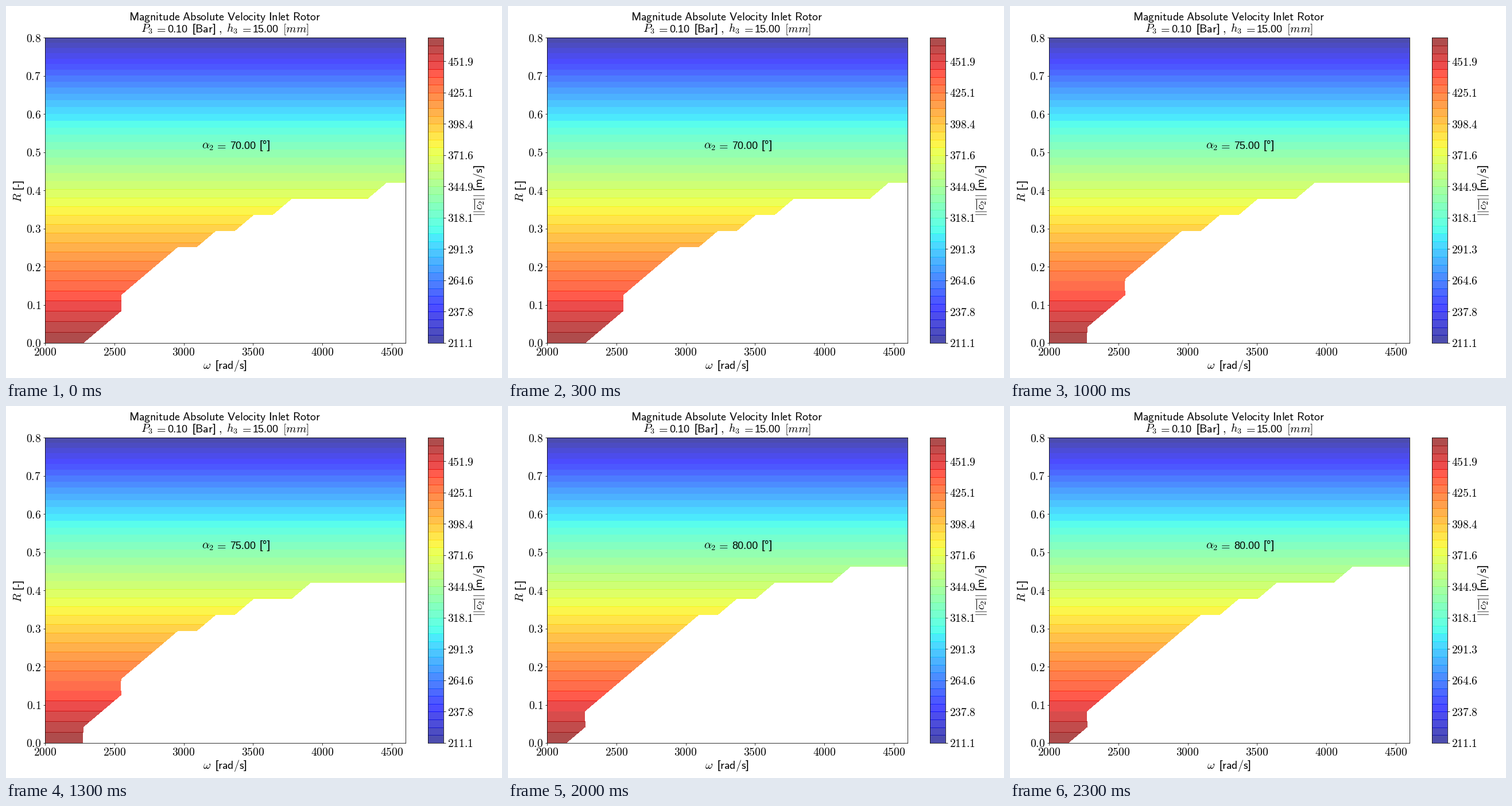
Write a matplotlib script that moves like this. It is 864 by 648 pixels and loops after 2.5 s.

```python
import numpy as np
import matplotlib.pyplot as plt
from matplotlib.animation import FuncAnimation

W, H = 864, 648
DPI = 72
TOP, BOTTOM = 55.45, 586.95
DIGITS = 18  # size of the sans-serif numbers

plt.rcParams.update({
    "font.family": "Liberation Sans",
    "font.size": 20,
    "xtick.labelsize": 19.6,
    "ytick.labelsize": 19.6,
    "mathtext.fontset": "cm",
})

fig = plt.figure(figsize=(W / DPI, H / DPI), dpi=DPI, facecolor="white")


def px_axes(left, right):
    """Axes between two pixel columns, spanning the shared rows."""
    return fig.add_axes([left / W, 1 - BOTTOM / H,
                         (right - left) / W, (BOTTOM - TOP) / H])


def label(x, y, text, size=20, rotation=0):
    return fig.text(x / W, 1 - y / H, text, size=size, rotation=rotation,
                    ha="center", va="baseline", rotation_mode="anchor")


def number_format(digits):
    return lambda value, _: f"${value:.{digits}f}$"


# Velocity field: depends on the degree of reaction only
N = 20
omega = np.linspace(2000, 4600, N)
reaction = np.linspace(0, 0.8, N)
speed = 471.97 * np.sqrt(1 - reaction)[:, None] * np.ones(N)
levels = np.linspace(speed.min(), speed.max(), 40)

# Last feasible speed column in each reaction row, per flow angle
angles = [70, 72.5, 75, 77.5, 80]
limits = [
    [2, 3, 4, 4, 5, 6, 8, 10, 12, 17],
    [2, 3, 3, 4, 5, 6, 7, 9, 11, 14],
    [2, 2, 3, 4, 4, 5, 6, 8, 10, 13],
    [1, 2, 2, 3, 4, 5, 6, 7, 9, 12, 16],
    [1, 2, 2, 3, 4, 5, 6, 7, 9, 11, 15],
]

ax = px_axes(68.15, 696.05)


def draw_map(limit):
    last = np.full(N, N - 1)
    last[:len(limit)] = limit
    field = np.ma.masked_where(np.arange(N) > last[:, None], speed)
    return ax.contourf(omega, reaction, field, levels, cmap="jet", alpha=0.7)


maps = [draw_map(limit) for limit in limits]
ax.set(xlim=(2000, 4600), ylim=(0, 0.8),
       xticks=np.arange(2000, 4501, 500), yticks=np.linspace(0, 0.8, 9))
ax.xaxis.set_major_formatter(number_format(0))
ax.yaxis.set_major_formatter(number_format(1))

# Colour scale: bands blended with white, darker seams between them
bar = px_axes(735.25, 761.85)
middles = (levels[:-1] + levels[1:]) / 2
rgb = maps[0].cmap(maps[0].norm(middles))[:, :3]
bar.pcolormesh([0, 1], levels, (0.3 + 0.7 * rgb)[:, None, :])
bar.hlines(levels[1:-1], 0, 1, colors=0.09 + 0.91 * rgb[1:], linewidth=1)
bar.set(xlim=(0, 1), ylim=(levels[0], levels[-1]),
        xticks=[], yticks=levels[::4])
bar.yaxis.tick_right()
bar.yaxis.set_major_formatter(number_format(1))

# Title
label(381, 25, r"$\mathsf{Magnitude\ Absolute\ Velocity\ Inlet\ Rotor}$", 19.8)
for x, text in [(245.5, "$P_3$"), (268.5, "$=$"), (345, r"[$\mathsf{Bar}$]"),
                (373.5, "$,$"), (394, "$h_3$"), (417.5, "$=$"),
                (504.5, "$[mm]$")]:
    label(x, 46, text)
label(298.5, 46, "0.10", DIGITS)
label(452.5, 46, "15.00", DIGITS)

# Axis labels
label(350.5, 632, r"$\omega$")
label(392, 632, r"[$\mathsf{rad/s}$]")
for x, y, text in [(27, 333, "$R$"), (27, 310.5, "[-]"),
                   (830, 347, r"$||\overline{c_2}||$"),
                   (830, 299.5, r"[$\mathsf{m/s}$]")]:
    label(x, y, text, rotation=90)

# Flow angle readout
label(351.5, 249, r"$\alpha_2$")
label(374, 249, "$=$")
angle_text = label(413, 249, "", DIGITS)
label(451.5, 249, "[°]")


def update(frame):
    for i, contour in enumerate(maps):
        contour.set_visible(i == frame)
    angle_text.set_text(f"{angles[frame]:.2f}")
    return [*maps, angle_text]


anim = FuncAnimation(fig, update, frames=len(angles), interval=500,
                     init_func=lambda: update(0), repeat=True,
                     repeat_delay=0, blit=False)
update(0)
plt.show()
```
